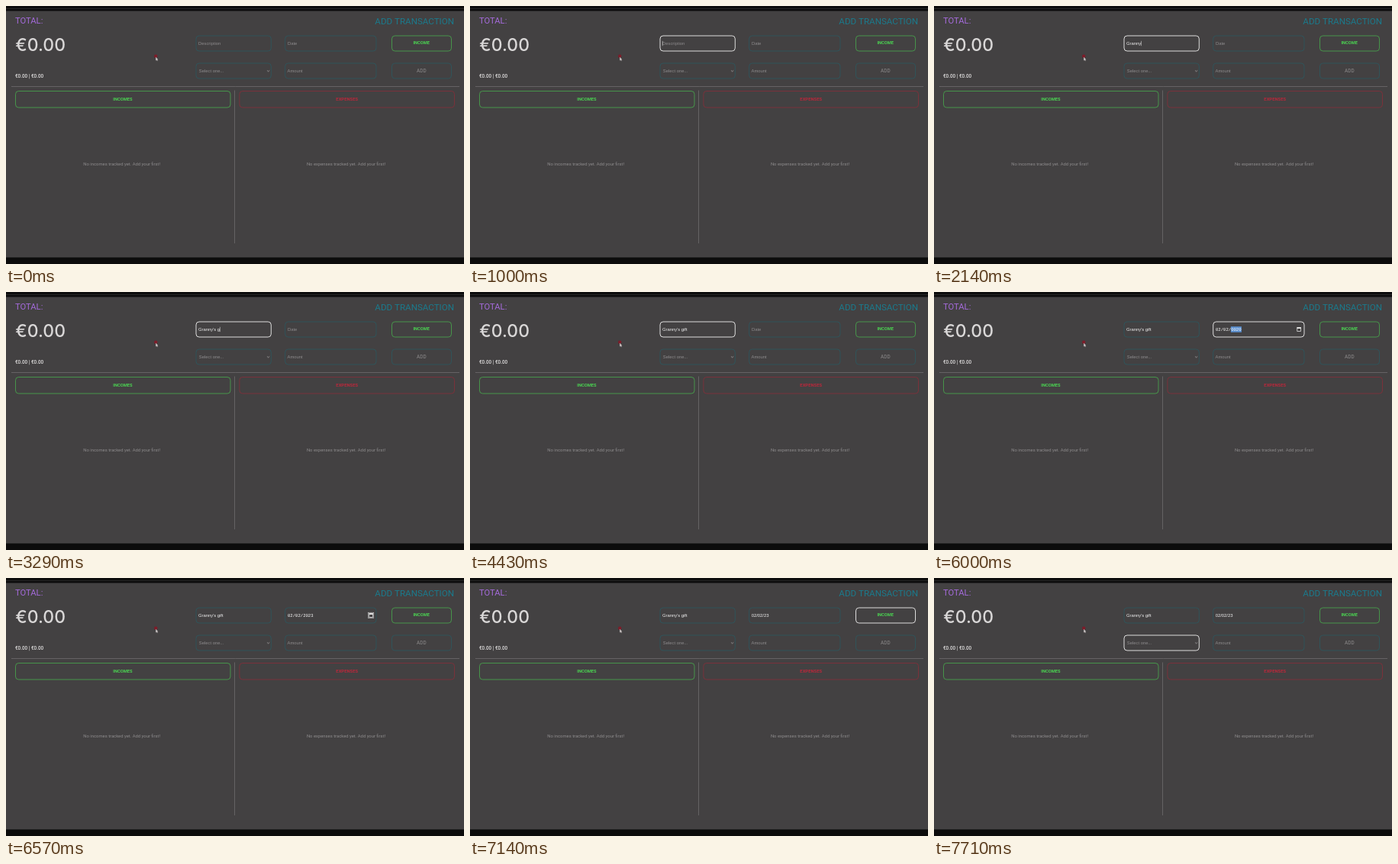
Recreate the animation shown at these times as an HTML page with a canvas. Size 600x338 px, loop 8 s.

```html
<!DOCTYPE html>
<html lang="en">
<head>
<meta charset="utf-8">
<title>Budget tracker</title>
<style>
  html, body { margin: 0; width: 100%; height: 100%; overflow: hidden; background: #434142; }
  canvas { display: block; width: 100%; height: 100%; }
</style>
</head>
<body>
<canvas id="stage"></canvas>
<script>
const W = 600, H = 338, LOOP = 8000;
const canvas = document.getElementById('stage');
const ctx = canvas.getContext('2d');

const BG = '#434142', TEAL = '#2a5a62', GREEN = '#4bd352', GREEN_EDGE = '#49b04e';
const RED = '#b9283b', RED_EDGE = '#8c2c39', RULE = '#706e6f';
const GREY = '#8e8c8d', WHITE = '#f2f2f2', RING = '#dddcdc';
const UI = 'Roboto, sans-serif';
const FORM = '5.85px "Liberation Sans", Arial, sans-serif';
const MONO = '5.6px "Liberation Mono", monospace';
const CELL = 3.36;

// Latest entry of [time, value] pairs that has started by time t
function at(steps, t) {
  let value = steps[0][1];
  for (const [start, v] of steps) if (t >= start) value = v;
  return value;
}

const NOTE = "Granny's gift";
const keyTimes = [1290, 1430, 1570, 1710, 1860, 2140, 2430, 2570, 2860, 3290, 3430, 3860, 4000];

const focusSteps = [
  [0, ''], [1000, 'note'], [4570, 'date'], [6570, 'picker'], [7000, 'income'], [7570, 'select']
];

// Date parts and the index of the selected one
const dateSteps = [
  [4570, ['gg', 'mm', 'aaaa', 0]],
  [4860, ['00', 'mm', 'aaaa', 0]],
  [5000, ['02', 'mm', 'aaaa', 1]],
  [5430, ['02', '00', 'aaaa', 1]],
  [5570, ['02', '02', 'aaaa', 2]],
  [5860, ['02', '02', '0002', 2]],
  [6000, ['02', '02', '0020', 2]],
  [6140, ['02', '02', '0202', 2]],
  [6290, ['02', '02', '2023', 2]],
  [6570, ['02', '02', '2023', -1]]
];

function text(str, x, y, font, color, align = 'left') {
  ctx.font = font;
  ctx.fillStyle = color;
  ctx.textAlign = align;
  ctx.fillText(str, x, y);
}

function box(x, y, w, h, color, width = 0.75) {
  ctx.beginPath();
  ctx.roundRect(x, y, w, h, 4);
  ctx.strokeStyle = color;
  ctx.lineWidth = width;
  ctx.stroke();
}

function field(x, y, w, focused, color = TEAL) {
  box(x, y, w, 20, focused ? RING : color, focused ? 1 : 0.75);
}

function line(points, color, width) {
  ctx.beginPath();
  points.forEach(([x, y]) => ctx.lineTo(x, y));
  ctx.strokeStyle = color;
  ctx.lineWidth = width;
  ctx.stroke();
}

function drawPage() {
  ctx.fillStyle = BG;
  ctx.fillRect(0, 0, W, H);
  ctx.fillStyle = '#0c0c0c';
  ctx.fillRect(0, 0, W, 6.5);
  ctx.fillRect(0, 329.4, W, 9);
  ctx.fillStyle = '#262626';
  ctx.fillRect(0, 3, W, 1);

  text('TOTAL:', 12, 23.3, '11.2px ' + UI, '#a66bdd');
  text('€0.00', 12.3, 59, '500 23px Inter, sans-serif', '#d9d7d7');
  text('€0.00 | €0.00', 12, 94, '500 6.35px ' + UI, '#e2e0e0');
  text('ADD TRANSACTION', 587, 24.3, '11.6px ' + UI, '#1b7a8c', 'right');

  line([[7, 105.5], [594, 105.5]], RULE, 0.75);
  line([[299.5, 110.5], [299.5, 311]], RULE, 0.75);

  box(12.5, 111.5, 281.5, 21.5, GREEN_EDGE);
  box(305.9, 111.5, 281.6, 21.5, RED_EDGE);
  text('INCOMES', 153, 124.4, '700 5.75px ' + UI, GREEN, 'center');
  text('EXPENSES', 446.7, 124.4, '700 5.85px ' + UI, RED, 'center');
  text('No incomes tracked yet. Add your first!', 151.7, 209.3, '5.86px ' + UI, GREY, 'center');
  text('No expenses tracked yet. Add your first!', 445.5, 209.3, '5.86px ' + UI, GREY, 'center');
}

function drawNote(t, focused) {
  field(249, 39, 98.3, focused);
  const note = NOTE.slice(0, keyTimes.filter(k => t >= k).length);
  text(note || 'Description', 252, 51, FORM, note ? WHITE : GREY);
  if (focused && t < 4430) {
    const x = 252.3 + ctx.measureText(note).width;
    line([[x, 45.8], [x, 52.2]], WHITE, 0.5);
  }
}

function drawPicker(focused) {
  ctx.strokeStyle = ctx.fillStyle = WHITE;
  ctx.lineWidth = 0.7;
  ctx.strokeRect(475.8, 46.6, 4.8, 4.8);
  ctx.fillRect(475.8, 46.4, 4.8, 1.5);
  if (focused) {
    ctx.lineWidth = 0.5;
    ctx.strokeRect(474.6, 45.2, 7.2, 7.4);
  }
}

function drawDate(t, focus) {
  field(365.7, 39, 119.3, focus === 'date');
  if (t < 4570) return text('Date', 369, 51, FORM, GREY);
  if (t >= 7000) return text('02/02/23', 368.7, 51, FORM, WHITE);

  const parts = at(dateSteps, t);
  const selected = parts[3];
  if (selected >= 0) {
    ctx.fillStyle = '#5b8fcf';
    ctx.fillRect(368.7 + selected * 3 * CELL, 45.2, parts[selected].length * CELL + 0.6, 7.6);
  }
  text(parts.slice(0, 3).join('/'), 369, 50.9, MONO, '#ffffff');
  drawPicker(focus === 'picker');
}

function drawForm(t) {
  const focus = at(focusSteps, t);
  drawNote(t, focus === 'note');
  drawDate(t, focus);

  field(505.5, 39, 78, focus === 'income', GREEN_EDGE);
  text('INCOME', 544.2, 50.3, '700 5.7px ' + UI, GREEN, 'center');

  field(249, 75, 98.3, focus === 'select');
  text('Select one...', 252.8, 87.2, FORM, GREY);
  line([[342, 84.4], [343.6, 85.8], [345.2, 84.4]], '#a5a3a4', 0.8);

  field(365.7, 75, 119.3, false);
  text('Amount', 368.5, 87, FORM, GREY);

  field(505.5, 75, 78, false);
  text('ADD', 544.4, 87.2, '6.4px ' + UI, GREY, 'center');
}

function drawPointer() {
  ctx.fillStyle = '#7d1c29';
  ctx.beginPath();
  ctx.arc(196.2, 65.8, 2.2, 0, Math.PI * 2);
  ctx.fill();
  ctx.fillStyle = '#c9c2c2';
  ctx.beginPath();
  [[196.2, 66.8], [196.2, 71.6], [197.3, 70.7], [198, 72.2], [198.7, 71.8], [198.1, 70.5], [199.3, 70.2]]
    .forEach(([x, y]) => ctx.lineTo(x, y));
  ctx.fill();
}

function resize() {
  const ratio = window.devicePixelRatio || 1;
  canvas.width = Math.round(innerWidth * ratio);
  canvas.height = Math.round(innerHeight * ratio);
}

const begin = performance.now();

function frame() {
  const t = (performance.now() - begin) % LOOP;
  ctx.setTransform(canvas.width / W, 0, 0, canvas.height / H, 0, 0);
  drawPage();
  drawForm(t);
  drawPointer();
  requestAnimationFrame(frame);
}

addEventListener('resize', resize);
resize();
frame();
</script>
</body>
</html>
```
